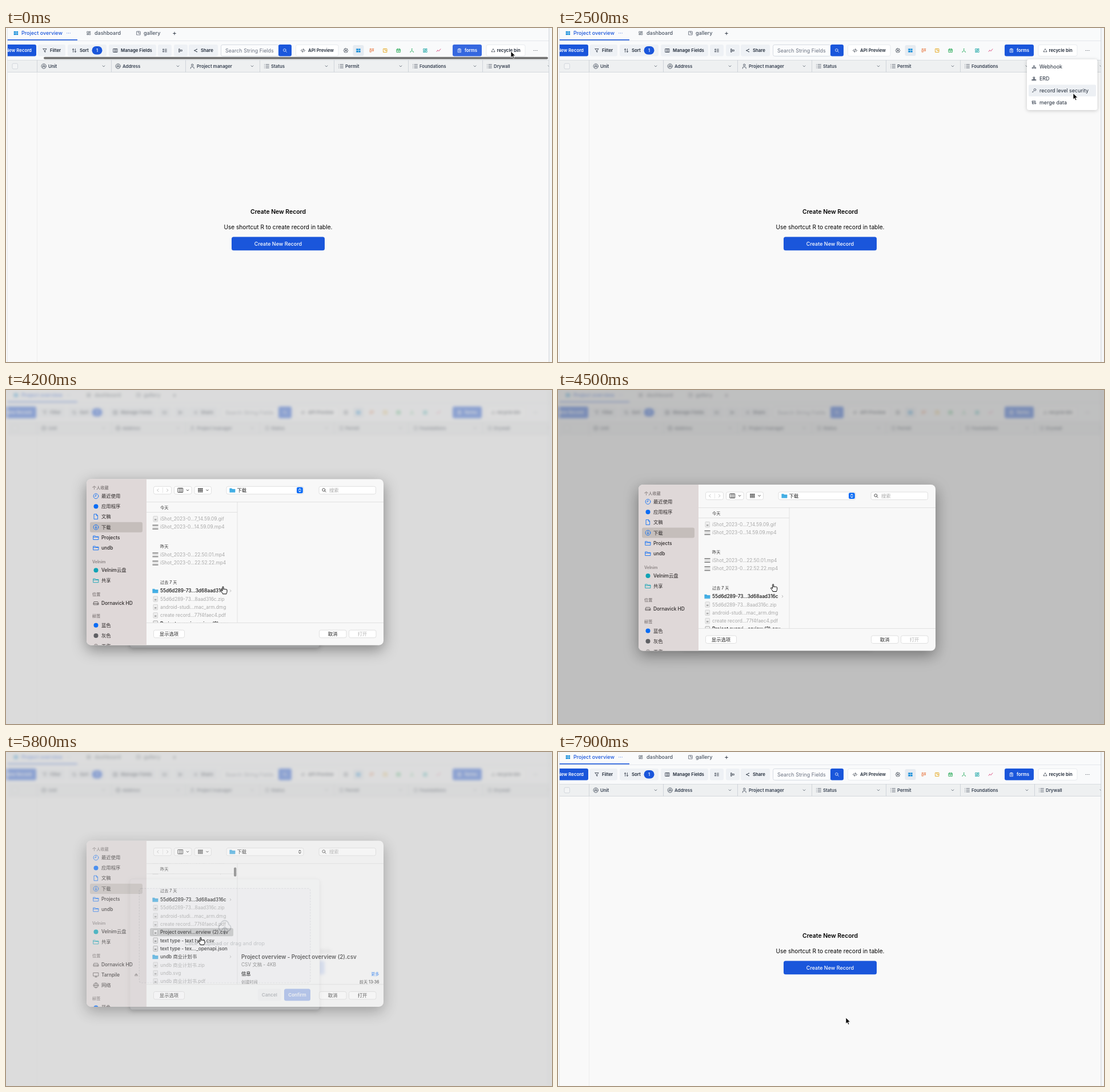
Write an HTML page that moves like this. It is 956 by 586 pixels and loops after 8 s.

```html
<!DOCTYPE html>
<html lang="zh-CN">
<head>
<meta charset="utf-8">
<title>Merge data</title>
<style>
html, body { margin: 0; width: 100%; height: 100%; overflow: hidden; background: #f9f9f9; }
svg { display: block; font-family: Inter, "Noto Sans CJK SC", "Noto Sans CJK", sans-serif; white-space: pre; }
#modal { filter: drop-shadow(0 2px 4px #0003); }
#menu { filter: drop-shadow(0 1px 3px #0003); }
#dialog { filter: drop-shadow(0 8px 13px #0006); }
</style>
</head>
<body>
<svg id="stage" width="956" height="586" viewBox="0 0 956 586"></svg>
<script>
const LOOP = 8000;
const BLUE = '#1a56db', INK = '#1f2937', MAC = '#0a6cf5';

// Icon outlines on a 24 unit grid
const ICONS = {
  grid: 'M3 4h8v6H3zM14 4h7v6h-7zM3 13h8v7H3zM14 13h7v7h-7z',
  dash: 'M4 4h6v8H4zM14 4h6v4h-6zM4 16h6v4H4zM14 12h6v8h-6z',
  gallery: 'M4 4h16v16H4zM11 4v8h9',
  plus: 'M12 4v16M4 12h16',
  filter: 'M4 4h16l-6 8v8l-4-3v-5z',
  sort: 'M7 20V4L3 8M7 4l4 4M17 4v16l-4-4M17 20l4-4',
  columns: 'M3 4h18v16H3zM9 4v16M15 4v16',
  rows: 'M5 5v14M2 8l3-3 3 3M2 16l3 3 3-3M12 6h9M12 12h9M12 18h9',
  insert: 'M5 4h3v16H5zM12 9h8v6h-8z',
  share: 'M18 6L6 12l12 6M17 6h2M5 12h2M17 18h2',
  search: 'M17 10a7 7 0 1 1-14 0 7 7 0 0 1 14 0M15 15l6 6',
  code: 'M7 7l-5 5 5 5M17 7l5 5-5 5M14 4l-4 16',
  gear: 'M12 2l3 3h4v4l3 3-3 3v4h-4l-3 3-3-3H5v-4l-3-3 3-3V5h4zM15 12a3 3 0 1 1-6 0 3 3 0 0 1 6 0',
  kanban: 'M3 4h7M14 4h7M4 8h5v11H4zM15 8h5v6h-5z',
  calendar: 'M4 6h16v14H4zM4 11h16M8 3v5M16 3v5M10 15h4',
  tree: 'M12 4v9l-7 5M12 13l7 5M11 4h2M4 19h2M18 19h2',
  line: 'M3 17l5-7 5 5 8-10',
  clip: 'M5 5h14v16H5zM9 3h6v4H9zM9 12h6M9 16h6',
  recycle: 'M9 9l3-5 3 5M17 12l3 6h-6M10 18H4l3-6',
  dots: 'M4 12h.1M12 12h.1M20 12h.1',
  down: 'M6 9l6 6 6-6', left: 'M15 5l-7 7 7 7', right: 'M9 5l7 7-7 7',
  updown: 'M7 9l5-5 5 5M7 15l5 5 5-5',
  letter: 'M22 12a10 10 0 1 1-20 0 10 10 0 0 1 20 0M8 17V11a4 4 0 0 1 8 0v6M8 13h8',
  user: 'M16 7a4 4 0 1 1-8 0 4 4 0 0 1 8 0M5 22v-3a4 4 0 0 1 4-4h6a4 4 0 0 1 4 4v3',
  list: 'M9 5h13M9 12h13M9 19h13M3 5h.1M3 12h.1M3 19h.1',
  hook: 'M9 8a3 3 0 1 1 6 0 3 3 0 0 1-6 0M3 17a3 3 0 1 1 6 0 3 3 0 0 1-6 0M15 17a3 3 0 1 1 6 0 3 3 0 0 1-6 0M11 11l-4 4M9 17h6M14 11l3 4',
  erd: 'M9 4h6v5H9zM3 16h5v4H3zM16 16h5v4h-5zM10 16h4v4h-4zM12 9v7M12 10l-6 6M12 10l6 6',
  key: 'M21 8a5 5 0 1 1-10 0 5 5 0 0 1 10 0M12 12l-8 8M6 18l2 2',
  merge: 'M4 5h14v5H4zM4 10v9h8M4 14h9M18 12v8M14 16h8',
  cloud: 'M7 17a5 5 0 0 1-1-9.5 6 6 0 0 1 12 0A5 5 0 0 1 17 17M12 22V11M8 15l4-4 4 4',
  card: 'M3 5h18v14H3zM3 10h18M7 15h3M14 15h3',
  paperclip: 'M20 11l-8 8a5 5 0 0 1-7-7l8-8a3 3 0 0 1 5 5l-8 8a1 1 0 0 1-2-2l7-7',
  clock: 'M22 12a10 10 0 1 1-20 0 10 10 0 0 1 20 0M12 6v6H7',
  page: 'M5 2h9l5 5v15H5zM14 2v6h5',
  save: 'M22 12a10 10 0 1 1-20 0 10 10 0 0 1 20 0M12 6v11M8 13l4 4 4-4',
  folder: 'M2 5h7l2 3h11v12H2zM2 10h20',
  disk: 'M5 7h14l3 7v5H2v-5zM2 14h20M17 17h2',
  screen: 'M2 4h20v13H2zM8 21h8M12 17v4',
  globe: 'M22 12a10 10 0 1 1-20 0 10 10 0 0 1 20 0M2 12h20M12 2c-6 6-6 14 0 20c6-6 6-14 0-20',
  eject: 'M4 14l8-9 8 9zM4 18h16',
  tiles: 'M3 4h4v4H3zM10 4h4v4h-4zM17 4h4v4h-4zM3 11h4v4H3zM10 11h4v4h-4zM17 11h4v4h-4zM3 18h4v2H3zM10 18h4v2h-4zM17 18h4v2h-4z'
};

const text = (x, y, s, size, fill = INK, weight = 400, anchor = 'start') =>
  `<text x="${x}" y="${y + size * .36}" font-size="${size}" fill="${fill}" font-weight="${weight}" text-anchor="${anchor}">${s}</text>`;
const rect = (x, y, w, h, fill, r = 0, extra = '') =>
  `<rect x="${x}" y="${y}" width="${w}" height="${h}" rx="${r}" fill="${fill}" ${extra}/>`;
const icon = (name, x, y, size, color = INK, width = 2, fill = 'none') =>
  `<path d="${ICONS[name]}" transform="translate(${x - size / 2} ${y - size / 2}) scale(${size / 24})" fill="${fill}" stroke="${color}" stroke-width="${width}" stroke-linecap="round" stroke-linejoin="round"/>`;
const dot = (x, y, r, fill) => `<circle cx="${x}" cy="${y}" r="${r}" fill="${fill}"/>`;
const group = (id, body, extra = '') => `<g id="${id}" ${extra}>${body}</g>`;
const stroke = c => `stroke="${c}" stroke-width=".8"`;

function page() {
  let s = rect(0, 0, 956, 586, '#f9f9f9') + rect(0, 0, 956, 56, '#f9fafb') + rect(2, 22, 949, .8, '#dfe3e8');
  s += icon('grid', 17.5, 9, 9, '#0c8ad8', 1, '#0c8ad8') + text(27, 9, 'Project overview', 9, BLUE, 500) +
    icon('dots', 109.5, 9, 8, BLUE, 3) + rect(2, 20, 123, 1.6, BLUE);
  s += icon('dash', 145, 9, 8.5, '#4b5563') + text(155, 9, 'dashboard', 9, '#4b5563', 500) +
    icon('gallery', 232, 9, 9, '#4b5563') + text(241, 9, 'gallery', 9, '#4b5563', 500) + icon('plus', 295, 9.5, 7, INK, 3);

  const label = (x, str, color = INK, anchor) => text(x, 39.5, str, 7.8, color, 600, anchor);
  s += rect(-20, 29, 73, 20.5, BLUE, 3) + label(45, 'New Record', '#fff', 'end');
  for (const [x, w] of [[56, 48], [108, 68], [180, 83], [266, 24], [294, 24], [320, 51]]) s += rect(x, 29, w, 20.5, '#eef1f5', 3);
  s += icon('filter', 68, 39.5, 9) + label(77, 'Filter') + icon('sort', 119.5, 39.5, 9) + label(129, 'Sort') +
    rect(150.5, 32, 18, 14.5, BLUE, 7.2) + text(159.5, 39.5, '1', 7.2, '#fff', 600, 'middle') +
    icon('columns', 191.5, 39.5, 9) + label(201, 'Manage Fields') + icon('rows', 278, 39.5, 9) +
    icon('insert', 305.5, 39.5, 8.5) + icon('share', 332, 39.5, 8.5, INK, 2.6) + label(341, 'Share');
  s += rect(376.5, 29.4, 101, 20, '#fbfcfd', 3, stroke('#cfd4db')) + text(384, 39.7, 'Search String Fields', 8.95, '#6b7280') +
    rect(477, 29, 23, 20.5, BLUE, 3) + icon('search', 488.5, 39.5, 8, '#fff', 2.2);
  s += rect(507.5, 29.4, 74.5, 20, '#fff', 3, stroke('#e2e6eb')) + icon('code', 520, 39.5, 8.5, INK, 2.4) + label(529, 'API Preview') +
    icon('gear', 595, 39.5, 9.5) + rect(607.5, 30, 19, 19, '#e6ebf1', 3) + icon('grid', 617, 39.5, 9, '#0c8ad8', 1, '#0c8ad8');
  [['kanban', '#e8743b'], ['gallery', '#e3a008'], ['calendar', '#16a34a'], ['tree', '#22a95a'], ['dash', '#14a3a3'], ['line', '#d6336c']]
    .forEach(([n, c], i) => s += icon(n, 640.5 + i * 23.4, 39.5, 9, c, 2.2));
  s += `<rect id="forms" x="782" y="29" width="51" height="20.5" rx="3"/>` + icon('clip', 794, 39.5, 8.5, '#fff') + label(803, 'forms', '#fff') +
    rect(841, 29.4, 68, 20, '#fff', 3, stroke('#e2e6eb')) + icon('recycle', 853, 39.5, 9) + label(859.5, 'recycle bin') +
    icon('dots', 927, 39.5, 8.5, INK, 3.2);

  s += rect(2, 56, 949, 21.5, '#eef0f1') + rect(2, 56, 949, .8, '#d5d9de') + rect(2, 77, 949, .8, '#cfd3d8') +
    rect(11, 62.3, 9.5, 9.5, '#f3f4f5', 2, stroke('#cbd0d6'));
  ['Unit', 'Address', 'Project manager', 'Status', 'Permit', 'Foundations', 'Drywall'].forEach((name, i) => {
    const x = 54 + 130 * i;
    s += rect(x, 56, .8, 21.5, '#c9ced4') +
      icon(i < 2 ? 'letter' : i == 2 ? 'user' : 'list', x + 12.2, 67, 10, '#374151', 1.9) +
      text(x + 20, 67.2, name, 7.8, '#374151', 600) + icon('down', x + 117, 67, 8, '#4b5563', 2.2);
  });
  s += rect(54, 78, .8, 508, '#ebebec') + rect(0, 0, 2, 586, '#f9fafb') + rect(2, 0, .8, 586, '#dfe2e6') +
    rect(951, 0, 5, 586, '#f4f6f8') + rect(950.3, 0, 1, 586, '#cdd2d8');
  s += text(476.5, 322.7, 'Create New Record', 10.4, '#000', 600, 'middle') +
    text(476.5, 349, 'Use shortcut R to create record in table.', 10.1, '#000', 400, 'middle') +
    rect(395, 366.5, 163, 23.8, BLUE, 3.5) + text(476.5, 378.5, 'Create New Record', 9, '#fff', 500, 'middle');
  return s + rect(66, 50.8, 883, 4, '#737373', 2, 'id="bar"');
}

function menu() {
  const items = [['hook', 'Webhook'], ['erd', 'ERD'], ['key', 'record level security'], ['merge', 'merge data']];
  return rect(821, 55, 123.5, 89, '#fff', 4) + rect(824, 0, 118, 20.5, '#edf0f4', 2, 'id="hover"') +
    items.map(([n, s], i) => icon(n, 833.5, 68.2 + i * 20.8, 9, '#374151') + text(843, 68.2 + i * 20.8, s, 8.95, INK, 400)).join('');
}

function modal() {
  const chip = (x, y, w, n, s) => rect(x, y - 7.3, w, 14.6, '#eceff3', 7.3) +
    icon(n, x + 11, y, 8, INK) + text(x + 20, y, s, 8.05, INK, 600);
  return rect(217, 223, 332, 229, '#f9fafb', 4, 'id="panel" stroke="#e0e3e7" stroke-width=".8"') +
    group('drop', rect(233.3, 239.3, 299.5, 165.7, '#f1f3f7', 4, 'stroke="#b9bfc8" stroke-width="1.2" stroke-dasharray="3 2"') +
      icon('cloud', 383, 308, 28, '#7b8390', 1.6) +
      `<text x="383" y="338.6" font-size="9.1" fill="#4f5765" text-anchor="middle"><tspan font-weight="600">Click to upload</tspan> or drag and drop</text>`) +
    group('warn', rect(233.3, 372.5, 299.5, 76, '#faf5dd', 4, 'stroke="#c08f24" stroke-width="1.1"') +
      text(244, 390, 'unsupport field types to merge into table', 8.9, '#b06a14', 500) +
      chip(244, 410, 90, 'user', 'Project manager') + chip(339.5, 410, 158.5, 'card', 'Connect to "Project details" board') +
      chip(244, 431, 53, 'paperclip', 'gallery')) +
    group('actions', rect(441, 415.5, 41, 21, '#e9edf2', 3.5) + text(461.3, 426, 'Cancel', 8, INK, 600, 'middle') +
      rect(487, 415.5, 46, 21, BLUE, 3.5, 'id="confirm"') + text(510, 426, 'Confirm', 8, '#fff', 600, 'middle'));
}

function sidebar() {
  const head = (y, s) => text(151, y, s, 7.15, '#8b8484', 600);
  const row = (y, n, s, c = MAC) => (n ? icon(n, 157.5, y, 10.5, c, 2) : dot(157.5, y, 4, c)) + text(167, y, s, 8.35, '#2b2727', 500);
  const gray = '#5c5757', teal = '#11a3b5';
  return rect(141, 166, 105, 292, '#dfd8d8') + rect(147, 241.5, 92, 18, '#c5bebb', 3) +
    head(181, '个人收藏') + row(196, 'clock', '最近使用') + row(214, '', '应用程序') + row(232, 'page', '文稿') +
    row(250.5, 'save', '下载') + row(268.8, 'folder', 'Projects') + row(287, 'folder', 'undb') +
    head(311.5, 'Velnim') + row(326, '', 'Velnim云盘', teal) + row(344, 'folder', '共享', teal) +
    head(368.5, '位置') + row(383.5, 'disk', 'Dornavick HD', gray) +
    group('mounts', row(401.5, 'screen', 'Tarnpile', gray) + icon('eject', 228, 401.5, 8, '#8b8484', 2, '#8b8484') + row(420, 'globe', '网络', gray)) +
    group('tags', head(406.7, '标签') + row(422.5, '', '蓝色', MAC) + row(440.7, '', '灰色', '#5f5f63') +
      icon('clock', 157.5, 459, 8, gray) + text(167, 459, '工作', 8.35, '#2b2727', 500));
}

function fileList() {
  // kind: d folder, c selectable document, x disabled document, m disabled movie
  const file = (y, kind, s, id = '') => {
    const on = kind == 'd' || kind == 'c';
    const mark = kind == 'd' ? icon('folder', 261.5, y, 11, '#2f9fd8', 1, '#45b0e6')
      : kind == 'm' ? rect(256.5, y - 4, 10, 8, '#e4e4e4') + rect(256.5, y - 4, 10, 1.4, '#777') + rect(256.5, y + 2.6, 10, 1.4, '#777')
      : rect(258, y - 4.7, 7.5, 9.4, '#eee', .8, stroke(on ? '#999' : '#ccc')) + rect(260, y, 3.5, 2.5, on ? '#888' : '#aaa');
    return mark + `<g ${id}>` + text(270, y, s, 8.3, on ? '#111' : '#a9a9a9', on ? 500 : 400) + '</g>' +
      (kind == 'd' ? icon('right', 393, y, 6, '#888', 2.5) : '');
  };
  const head = (y, s) => text(270, y, s, 7.15, '#3a3a3a', 500);
  const week = [['d', '55d6d289-73...3d68aad316c'], ['x', '55d6d289-73...8aad316c.zip'], ['x', 'android-studi...mac_arm.dmg'],
    ['x', 'create record...77f4faec4.pdf'], ['c', 'Project overvi...erview (2).csv', 'id="picked"'], ['c', 'text type - text type.csv'],
    ['c', 'text type - tex..._openapi.json'], ['d', 'undb 商业计划书'], ['x', 'undb 商业计划书.zip'], ['x', 'undb.svg'], ['x', 'undb 商业计划书.pdf']];
  return rect(252, 412.2, 146, 14.2, MAC, 2.5, 'id="select"') +
    file(236, 'x', 'iShot_2023-0...7_14.59.09.gif') + file(250.3, 'm', 'iShot_2023-0...14.59.09.mp4') +
    head(284, '昨天') + file(299, 'm', 'iShot_2023-0...22.50.01.mp4') + file(313.3, 'm', 'iShot_2023-0...22.52.22.mp4') +
    head(347, '过去 7 天') + week.map(([k, s, id], i) => file(362.2 + i * 14.32, k, s, id)).join('');
}

function dialog() {
  const button = (x, y, w, h) => rect(x, y, w, h, '#fff', 3, stroke('#d9d9d9'));
  const rule = (x, y, w, h) => rect(x, y, w, h, '#dcdcdc');
  const mac = (x, y, s, size = 8.35, c = '#222', weight = 500, anchor) => text(x, y, s, size, c, weight, anchor);
  return `<g clip-path="url(#frame)">` + rect(141, 166, 520, 292, '#f8f8f8') + sidebar() +
    button(258.5, 179, 31, 13.5) + rule(274, 181, .7, 9.5) + icon('left', 266, 185.7, 8, '#999') + icon('right', 282.5, 185.7, 8, '#999') +
    button(294.5, 179, 30.5, 13.5) + icon('columns', 305.5, 185.7, 11, '#333') + icon('down', 318, 185.7, 7, '#333', 3.4) +
    button(330, 179, 29.5, 13.5) + icon('tiles', 340.5, 185.7, 10, '#333', 1.2, '#555') + icon('down', 352.5, 185.7, 7, '#333', 3.4) +
    button(386, 179, 135, 13.5) + icon('folder', 396.5, 185.7, 11, '#2f9fd8', 1, '#45b0e6') + mac(404.5, 185.7, '下载') +
    rect(509, 180.3, 10.8, 10.8, MAC, 2.5, 'id="knob"') + group('arrows', icon('updown', 514.4, 185.7, 8.5, 'currentColor', 3)) +
    button(548, 179, 99.5, 13.5) + icon('search', 557, 185.7, 8.5, '#333', 2.4) + mac(566, 185.7, '搜索', 8.35, '#a8a8a8', 400) +
    `<g clip-path="url(#list)">` + group('files', fileList()) + rect(246, 206.5, 159, 18, '#f8f8f8') +
    `<text id="sticky" x="270" y="218.6" font-size="7.15" fill="#3a3a3a" font-weight="500"></text>` +
    rule(246, 224, 159, .8) + rect(399, 0, 4.3, 16, '#7e7e7e', 2, 'id="thumb"') + '</g>' +
    `<g clip-path="url(#info)">` + group('preview',
      mac(412, 370.3, 'Project overview - Project overview (2).csv', 9.7, '#333', 600) + mac(412, 384, 'CSV 文稿 - 4KB', 8.3, '#777', 400) +
      mac(412, 399.5, '信息', 8.35, '#222', 700) + mac(653.5, 400, '更多', 7.15, MAC, 500, 'end') +
      mac(412, 414.3, '创建时间', 7.15, '#777', 500) + mac(653.5, 414.3, '前天 13:36', 7.15, '#333', 500, 'end')) + '</g>' +
    rule(246, 206, 415, .8) + rule(404.6, 206, .8, 212) + rule(246, 418, 415, .8) +
    button(258.5, 431, 54, 13.5) + mac(285.5, 437.6, '显示选项', 8.35, '#222', 500, 'middle') +
    button(548.5, 431, 47.5, 13.5) + mac(572, 437.6, '取消', 8.35, '#222', 500, 'middle') +
    button(600.5, 431, 47.5, 13.5) + group('open', mac(624, 437.6, '打开', 8.35, 'currentColor', 500, 'middle')) + '</g>';
}

const clip = (id, x, y, w, h, r = 0) => `<clipPath id="${id}">${rect(x, y, w, h, '#000', r)}</clipPath>`;
const $ = id => document.getElementById(id);

$('stage').innerHTML = `<defs>${clip('frame', 141, 166, 520, 291.5, 8)}${clip('list', 246, 206, 159, 212)}${clip('info', 405, 206, 256, 212)}</defs>` +
  group('page', page()) + group('menu', menu()) + rect(0, 0, 956, 586, '#f9f9f9', 0, 'id="veil"') + group('modal', modal()) +
  rect(0, 0, 956, 586, '#000', 0, 'id="dim"') + group('dialog', dialog()) +
  group('pointer', `<path id="arrow" d="M0 0v10.8l2.5-2.3 1.7 3.9 1.8-.8-1.7-3.8h3.5z" fill="#000" stroke="#fff" stroke-width=".8"/>
    <path id="hand" d="M-1 1c0-1.5 2-1.5 2 0v4c0-1 2-1 2 0c0-1 2-1 2 .3c0-1 2-.8 2 .5v3c0 2-1 2.200-1 4H-.5c0-1.800-3-4-3.500-6c0-1.200 1.600-1 3 .8z" fill="#fff" stroke="#000" stroke-width="1"/>`);

const ease = u => (u = Math.max(0, Math.min(1, u)), u * u * (3 - 2 * u));
const set = (id, props) => { for (const k in props) $(id).setAttribute(k, props[k]); };
const show = (id, on) => set(id, { opacity: +on });

// Pointer stops: time, x, y
const PATH = [[0, 884, 41], [300, 886, 41], [900, 926, 40], [1300, 926, 41], [1800, 908, 78], [2400, 902, 114], [2600, 902, 115],
  [3050, 880, 131], [3250, 880, 131], [3850, 381, 344], [4200, 380, 345], [4600, 376, 340], [5150, 307, 328], [5480, 308, 328],
  [5750, 340, 325], [5950, 345, 328], [6550, 464, 417], [6750, 464, 418], [7150, 504, 465], [8000, 504, 466]];

function pointerAt(t) {
  const i = PATH.findIndex(p => p[0] > t), a = PATH[i - 1], b = PATH[i];
  const u = ease((t - a[0]) / (b[0] - a[0]));
  return [a[1] + (b[1] - a[1]) * u, a[2] + (b[2] - a[2]) * u];
}

function draw(t) {
  const ramp = (from, to) => ease((t - from) / (to - from));
  const [x, y] = pointerAt(t);
  const hand = t > 3600 && t < 4600 || t > 5700 && t < 6050;
  set('pointer', { transform: `translate(${x} ${y})` });
  show('arrow', !hand);
  show('hand', hand);

  show('bar', 1 - ramp(150, 500));
  set('forms', { fill: t < 100 ? '#3567df' : BLUE });

  const row = Math.floor((y - 58) / 20.8);
  show('menu', t >= 1100 && t < 3250);
  set('hover', { y: 58 + row * 20.8, opacity: row >= 0 && row < 4 ? 1 : 0 });

  const shown = ramp(3250, 3450) - ramp(7270, 7480);
  const grown = t >= 6200 ? 1 : 0;
  $('page').style.filter = shown ? `blur(${2.4 * shown}px)` : 'none';
  show('veil', .6 * shown);
  show('modal', shown);
  set('panel', { y: 223 - 44 * grown, height: 229 + 88 * grown });
  set('drop', { transform: `translate(0 ${-44 * grown})` });
  set('actions', { transform: `translate(0 ${44 * grown})` });
  show('warn', grown);
  set('confirm', { fill: grown && x > 487 && y > 459 ? '#1e4bb8' : BLUE });

  const closing = t > 5660;
  const out = ramp(4060, 4330) - ramp(5660, 5940);
  show('dim', .23 * out);
  set('dialog', { opacity: Math.min(1, out * (closing ? 1.4 : 2)), transform: `translate(0 ${-21 * (1 - out)})` });
  const loaded = t >= 4600, picked = t >= 5450;
  show('mounts', loaded);
  set('tags', { transform: `translate(0 ${loaded ? 36.5 : 0})` });
  const scroll = 92.5 * ramp(4600, 5150);
  set('files', { transform: `translate(0 ${-scroll})` });
  $('sticky').textContent = scroll < 68 ? '今天' : '昨天';
  set('thumb', { y: 207 + scroll * .065, opacity: scroll > 0 ? 1 : 0 });
  set('select', { opacity: +picked, fill: closing ? '#c6c6c6' : MAC });
  $('picked').firstChild.setAttribute('fill', picked && !closing ? '#fff' : '#111');
  show('preview', picked);
  show('knob', !closing);
  set('arrows', { color: closing ? '#333' : '#fff' });
  set('open', { color: picked ? '#222' : '#b5b5b5' });
}

function tick() {
  draw(performance.now() % LOOP);
  requestAnimationFrame(tick);
}
tick();
</script>
</body>
</html>
```
